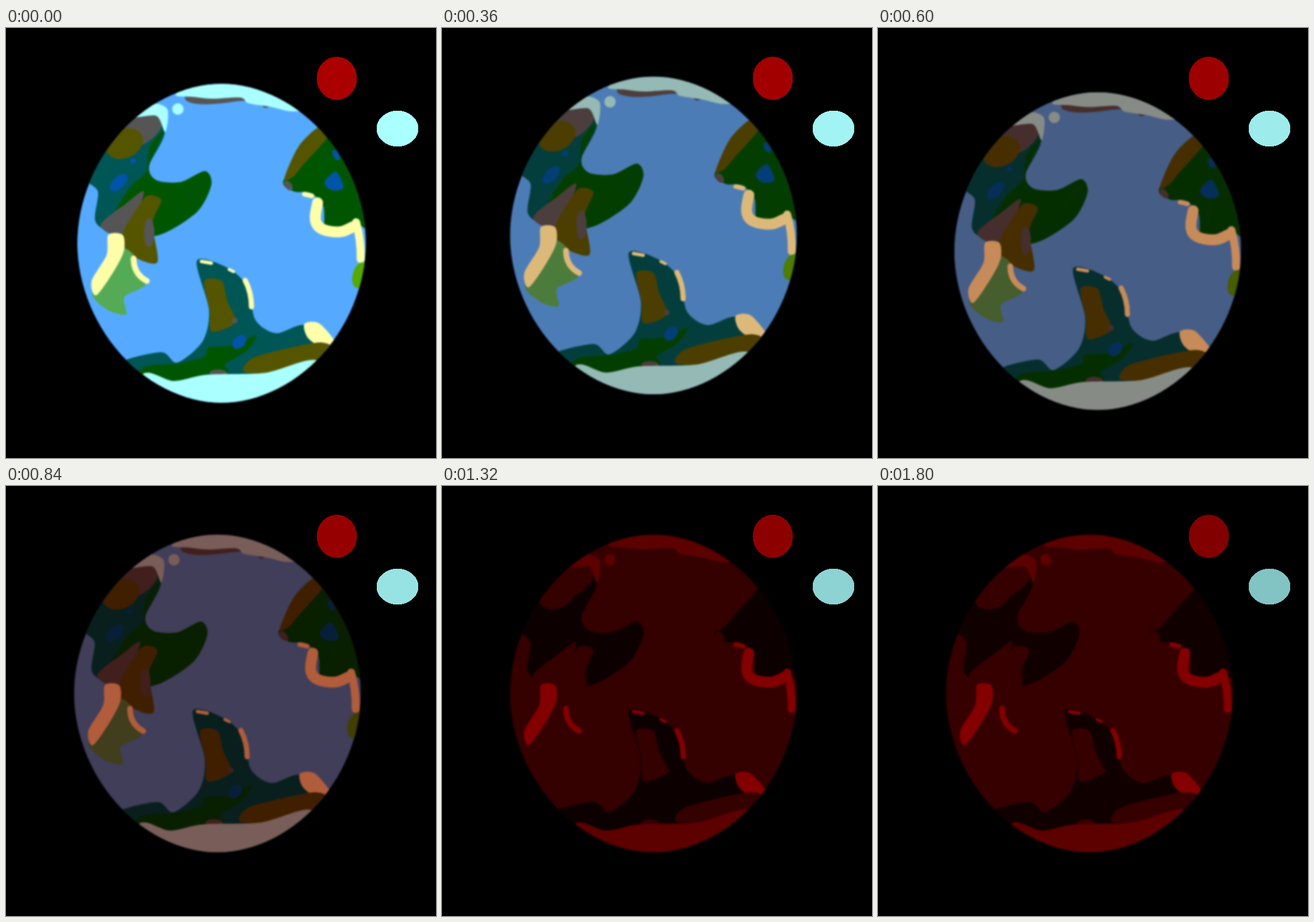
These frames come from a looping animation (748x748 px, 1.92 s). An HTML page:

```html
<!DOCTYPE html>
<html>
<head>
<meta charset="utf-8">
<style>
html, body { margin: 0; width: 100%; height: 100%; overflow: hidden; background: #000 }
svg { display: block; width: 100vw; height: 100vh }
</style>
</head>
<body>
<svg viewBox="0 0 748 748">
  <filter id="scorch" filterUnits="userSpaceOnUse" width="748" height="748" color-interpolation-filters="sRGB">
    <feGaussianBlur stdDeviation="1.7"/>
    <feColorMatrix id="heat" type="matrix"/>
  </filter>
  <clipPath id="disc"><polygon id="rim"/></clipPath>
  <g filter="url(#scorch)">
    <g id="planet" clip-path="url(#disc)"><rect width="748" height="748" fill="#5af"/></g>
  </g>
  <ellipse id="red" cx="575.5" cy="87.5" rx="35" ry="37.5" shape-rendering="crispEdges"/>
  <ellipse id="cyan" cx="681" cy="175" rx="36.5" ry="31.3" shape-rendering="crispEdges"/>
</svg>
<script>
const $ = id => document.getElementById(id);
const TEAL = '#055', GREEN = '#050', BROWN = '#550', GRAY = '#555', LAKE = '#05a',
  SAND = '#ffa', ICE = '#aff', GRASS = '#5a5', LIME = '#5a0';
const CX = 375, CY = 374.5;

function add(tag, attrs) {
  const el = document.createElementNS('http://www.w3.org/2000/svg', tag);
  for (const [k, v] of Object.entries(attrs)) el.setAttribute(k, v);
  $('planet').append(el);
}

// Closed smooth outline through a few "x,y" key points
function patch(fill, points) {
  const p = points.split(' ').map(s => s.split(',').map(Number)), n = p.length;
  const at = i => p[(i + n) % n];
  let d = 'M' + p[0];
  for (let i = 0; i < n; i++) {
    const [a, b, c, e] = [at(i - 1), at(i), at(i + 1), at(i + 2)];
    const c1 = b.map((v, k) => v + (c[k] - a[k]) / 7);
    const c2 = c.map((v, k) => v - (e[k] - b[k]) / 7);
    d += `C${c1} ${c2} ${c}`;
  }
  add('path', { fill, d });
}
const band = (stroke, width, d) =>
  add('path', { d, stroke, 'stroke-width': width, fill: 'none', 'stroke-linecap': 'round' });
const spot = (fill, cx, cy, rx, ry = rx, turn = 0) =>
  add('ellipse', { fill, cx, cy, rx, ry, transform: `rotate(${turn} ${cx} ${cy})` });

// Slightly pointed superellipse
const bend = v => Math.sign(v) * Math.abs(v) ** (2 / 1.92);
$('rim').setAttribute('points', Array.from({ length: 120 }, (_, i) => {
  const a = i * Math.PI / 60;
  return [CX + 251 * bend(Math.cos(a)), CY + 277.5 * bend(Math.sin(a))];
}).join(' '));

// North cap
band(GRAY, 14, 'M318,121Q335,130 390,122T452,132');
patch(ICE, '296,114 328,120 360,123 408,121 422,131 460,137 496,145 510,136 375,70');

// West continent
const westCoast = '276,178 249,240 262,265 304,268 346,249 357,273 330,322 257,362';
patch(TEAL, westCoast + ' 240,375 180,355 155,335 160,285 140,262 150,210 225,140');
patch(GREEN, westCoast + ' 190,330 217,276 244,250 250,207');
patch(GRAY, '200,168 245,135 271,170 236,203');
spot(BROWN, 206, 201, 34, 25, -25);
patch(ICE, '222,155 255,132 281,142 277,181 262,153');
spot(ICE, 299, 141, 10);
patch(GRAY, '240,285 208,306 165,341 185,359 215,350');
patch(BROWN, '250,291 270,300 255,340 263,408 215,393 203,358 236,302');
spot(GRAY, 249, 356, 9, 25);
spot(LAKE, 196, 269, 19, 10, -45);
spot(LAKE, 221, 231, 5);
band('#054f14', 2.5, 'M317,301Q322,276 344,264');

// Southwest tip
patch(GRASS, '206,384 226,400 222,422 243,447 206,468 209,498 176,490 150,460 190,410');
patch(SAND, '178,360 203,360 205,388 187,424 157,465 149,440 175,395');
band(SAND, 10, 'M222,401Q222,428 245,440');

// Northeast continent
patch(GREEN, '556,182 484,262 500,284 530,287 552,310 558,355 606,340 640,350 640,250 590,180');
patch(BROWN, '545,172 509,206 484,262 500,258 517,238 560,188');
spot(GRAY, 491, 274, 6, 10, -40);
band(SAND, 8, 'M519,289L532,292');
band(SAND, 19, 'M542,304C538,325 530,347 560,353S595,348 606,345');
band(SAND, 14, 'M609,338Q618,370 617,402');
spot(LIME, 616, 430, 13, 23, 15);
spot(LAKE, 574, 221, 5, 10, -30);
patch(LAKE, '574,250 587,278 566,282 554,268');
band('#054f14', 2.5, 'M571,294Q567,312 566,330');

// South continent
patch(TEAL, '332,405 385,417 420,450 434,508 470,531 523,517 580,565 540,610 240,610 200,582 270,564 298,582 342,545 353,490');
band(SAND, 6, 'M340,406L357,409');
band(SAND, 5, 'M388,420L396,424');
band(SAND, 9, 'M416,439Q427,460 427,485');
patch(SAND, '519,515 545,514 575,550 560,562 526,540');
patch(BROWN, '345,440 375,440 385,475 399,512 358,528 354,490');
spot(GRAY, 398, 509, 5);
patch(GREEN, '245,588 300,583 345,572 352,556 395,552 435,535 418,562 381,585 382,600 290,618 235,602');
spot(LAKE, 406, 546, 14, 10, -45);
patch(BROWN, '421,580 450,567 545,547 575,564 540,595 421,600');
spot(GRAY, 369, 600, 15, 6);

// South cap
patch(ICE, '238,602 292,614 350,603 450,600 545,580 560,680 200,680');

const STEP = 120, STEPS = 16, BURNT = 11;

function draw(now) {
  const n = Math.floor(now / STEP) % STEPS;
  const shake = Math.round(Math.sin(n * Math.PI / 2));
  const scale = shake ? 'scale(.994 .996)' : '';
  $('planet').setAttribute('transform',
    `translate(${CX + 7.2 * shake} ${CY + 13.6 * shake}) ${scale} translate(${-CX} ${-CY})`);

  // Green and blue burn away, red drops to about half
  const t = Math.min(1, n / BURNT), cool = 1 - t;
  const red = 1 - .53 * t - .004 * Math.max(0, n - BURNT);
  const glow = n * 1.08 / 255;
  $('heat').setAttribute('values',
    `${red} 0 0 0 ${glow} 0 ${cool} 0 0 0 0 0 ${cool * (1 - .08 * t)} 0 0 0 0 0 1 0`);

  const dim = 1 - .0157 * n;
  $('red').setAttribute('fill', `rgb(${170 * dim},0,0)`);
  $('cyan').setAttribute('fill', `rgb(${170 * dim},${255 * dim},${255 * dim})`);
}

let start;
function tick(now) {
  start ??= now;
  draw(now - start);
  requestAnimationFrame(tick);
}
draw(0);
requestAnimationFrame(tick);
</script>
</body>
</html>
```
